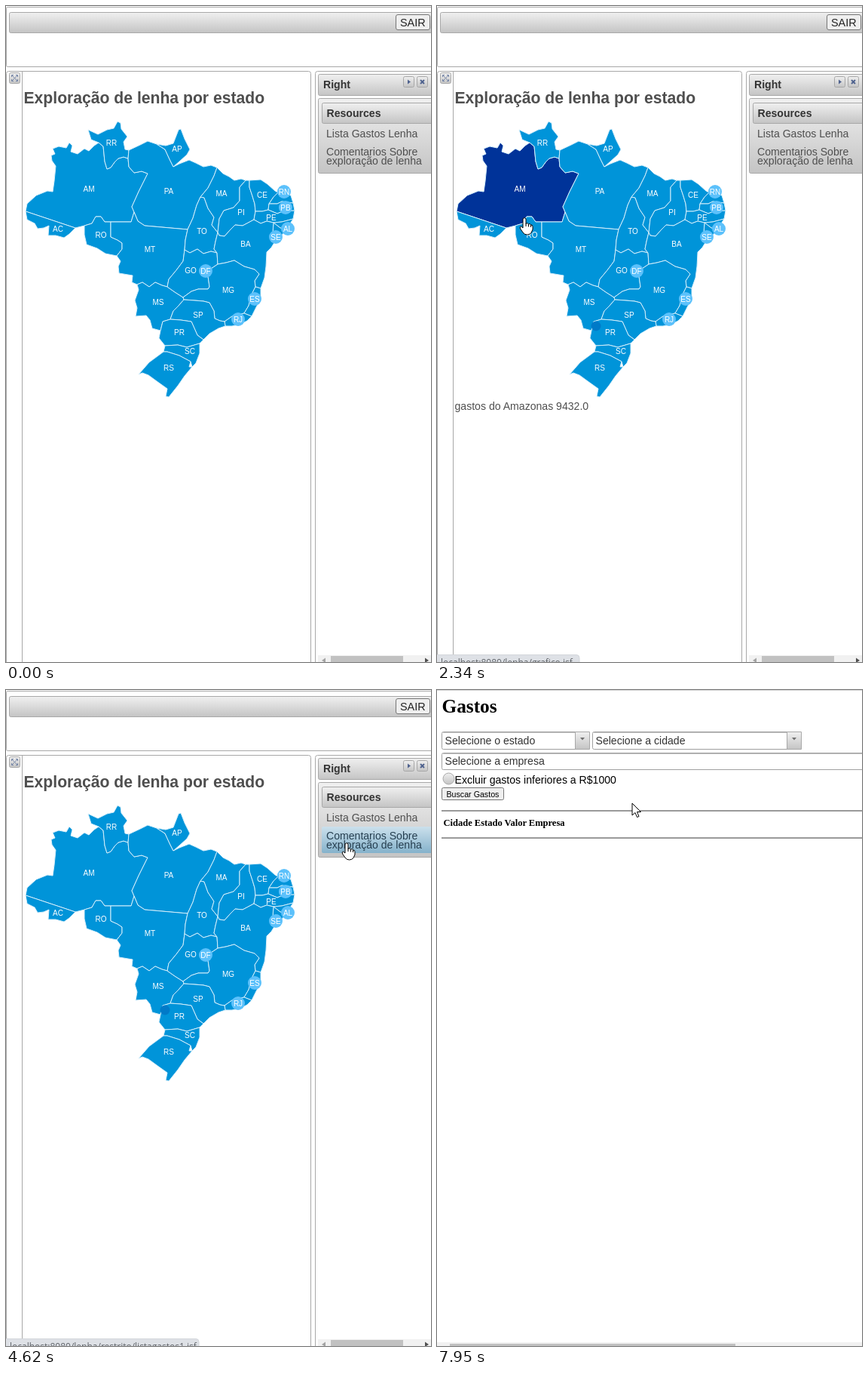
Write an HTML page that moves like this. It is 564 px wide and 869 px high and loops after 8000 ms.

```html
<!DOCTYPE html>
<html lang="pt">
<head>
<meta charset="utf-8">
<title>Gastos por estado</title>
<style>
html, body { margin: 0; width: 100%; height: 100%; overflow: hidden; background: #fff }
svg { display: block; font: 14.08px "Liberation Sans", Arial, sans-serif; fill: #4f4f4f }
.frame { fill: #fff; stroke: #a8a8a8 }
.bar { fill: url(#silver); stroke: #a8a8a8 }
.field { fill: #fff; stroke: #a0a0a0 }
.button { fill: #efefef; stroke: #767676 }
.track { fill: #f1f1f1 }
.thumb { fill: #c1c1c1 }
.icon { fill: #4f628e }
.tick { fill: #707070 }
.bold { font-weight: bold }
.serif { font-family: "Liberation Serif", Times, serif; font-weight: bold; fill: #000 }
#states path { fill: #0094d9; stroke: #d4eefb; stroke-linejoin: round }
#states .on { fill: #039 }
#labels { font-size: 10px; text-anchor: middle; fill: #fff }
#labels circle { fill: #5cc1fb }
#hand, #arrow { fill: #fff; stroke: #000; stroke-linejoin: round }
</style>
</head>
<body>
<svg width="564" height="869" viewBox="0 0 564 869">
<defs>
  <linearGradient id="silver" x2="0" y2="1"><stop stop-color="#f0f0f0"/><stop offset="1" stop-color="#c4c4c4"/></linearGradient>
  <linearGradient id="blue" x2="0" y2="1"><stop stop-color="#cbe0ec"/><stop offset="1" stop-color="#85b2cb"/></linearGradient>
</defs>

<g id="mapPage">
  <rect class="frame" x=".5" y="1.5" width="570" height="79" rx="2"/>
  <rect class="bar" x="4.5" y="8.5" width="566" height="27" rx="2"/>
  <rect class="button" x="517.5" y="11.5" width="45" height="20" rx="2.5"/>
  <text x="523" y="27" font-size="14.4" fill="#222">SAIR</text>
  <rect class="frame" x=".5" y="86.5" width="404" height="800" rx="3"/>
  <path d="M21.5 87V869" stroke="#a8a8a8"/>
  <rect class="bar" x="4.5" y="88.5" width="14" height="14" rx="2"/>
  <path d="M7.5 94V91.500H10M13 91.500h2.500V94M15.500 97v2.500H13M10 99.500H7.500V97M8 92l7 7M15 92l-7 7" fill="none" stroke="#7787a8"/>
  <text class="bold" x="23.500" y="129" font-size="21.15">Exploração de lenha por estado</text>

  <g id="states">
    <path id="AM" d="M26 272L28 262 40 251 55 245 62 246 64 232 66 212 61 205 60 198 65 196 62 189 70 186 80 188 84 181 88 185 86 193 95 196 104 189 110 192 117 185 123 181 129 186 131 206 134 216 139 214 144 207 149 202 156 200 162 202 163 213 170 221 180 219 188 222 176 246 167 266 170 273 166 286 139 286 131 286 126 279 119 279 114 288 104 291 92 294Z"/>
    <path id="AC" d="M26 272L92 294 84 302 77 307 66 304 56 304 57 291 50 294 42 295 38 288 28 283Z"/>
    <path id="RO" d="M104 291L114 288 119 279 126 279 131 286 139 286 139 306 148 310 154 314 154 322 147 331 132 328 121 321 107 316 104 303Z"/>
    <path id="RR" d="M109 164L122 170 134 164 143 162 148 153 152 155 153 163 161 173 156 180 158 190 163 191 162 202 156 200 149 202 144 207 139 214 134 216 131 206 129 186 123 181 113 177Z"/>
    <path id="PA" d="M163 191L178 184 188 179 200 183 211 190 217 203 222 213 230 209 243 204 252 208 262 213 272 211 280 214 276 225 268 241 258 253 253 264 248 281 241 296 184 291 175 285 170 273 167 266 176 246 188 222 180 219 170 221 163 213 162 202Z"/>
    <path id="AP" d="M200 183L212 185 222 182 229 164 232 163 237 176 244 190 240 197 230 206 222 213 217 203 211 190Z"/>
    <path id="MT" d="M139 286H166L170 273 175 285 184 291 241 296 238 310 237 323 235 338 226 350 216 362 214 372 207 370 198 366 190 372 181 366 174 369 167 366 168 357 150 354 149 345 152 338 147 331 154 322 154 314 148 310 139 306Z"/>
    <path id="MS" d="M174 369L181 366 190 372 198 366 207 370 214 372 224 379 235 386 236 389 229 397 222 404 218 415 208 418 205 430 194 427 191 416 186 410 172 411 174 400 171 390 176 376Z"/>
    <path id="TO" d="M258 253L263 254 268 268 276 280 273 290 281 300 278 312 276 322 280 327 272 325 262 328 254 322 244 327 237 323 238 310 241 296 248 281 253 264Z"/>
    <path id="GO" d="M237 323L244 327 254 322 262 328 272 325 280 327 281 342 272 348 268 358 270 372 268 375 255 375 246 378 235 386 224 379 214 372 216 362 226 350 235 338Z"/>
    <path id="MA" d="M280 214L288 222 296 226 303 231 312 229 318 231 310 240 310 258 302 267 289 271 283 282 281 300 273 290 276 280 268 268 263 254 258 253 268 241 276 225Z"/>
    <path id="PI" d="M318 231H323L323 240 327 252 330 262 331 272 329 283 314 291 304 290 298 296 290 305 283 304 281 300 283 282 289 271 302 267 310 258 310 240Z"/>
    <path id="CE" d="M323 231L338 230 347 236 357 245 361 247 355 253 349 262 348 270 340 272 331 272 330 262 327 252 323 240Z"/>
    <path id="RN" d="M361 247L368 248 378 251 381 261 366 259 360 262 349 262 355 253Z"/>
    <path id="PB" d="M349 262H360L366 259 381 261 383 271 367 272 360 275 348 270Z"/>
    <path id="PE" d="M331 272H340L348 270 360 275 367 272 383 271 381 282 366 286 355 287 346 285 338 288 329 283Z"/>
    <path id="AL" d="M355 287L366 286 381 282 372 296 364 294Z"/>
    <path id="SE" d="M355 287L364 294 372 296 364 306 357 312 354 300Z"/>
    <path id="BA" d="M281 300L283 304 290 305 298 296 304 290 314 291 329 283 338 288 346 285 355 287 354 300 357 312 352 320 346 326 345 345 343 360 338 374 331 372 330 364 336 355 330 349 316 345 303 337 292 340 281 342 280 327 276 322 278 312Z"/>
    <path id="MG" d="M281 342L292 340 303 337 316 345 330 349 336 355 330 364 331 372 326 382 322 397 316 407 300 411 290 418 284 417 277 414 276 404 270 393 262 391 250 390 236 389 235 386 246 378 255 375 268 375 270 372 268 358 272 348Z"/>
    <path id="ES" d="M331 372L338 374V388L332 399 326 411 316 407 322 397 326 382Z"/>
    <path id="RJ" d="M316 407L326 411 320 417 312 421 300 424 291 424 290 418 300 411Z"/>
    <path id="SP" d="M236 389L250 390 262 391 270 393 276 404 277 414 284 417 290 418 291 424 282 427 270 434 262 442 254 436 250 427 246 418 232 416 218 415 222 404 229 397Z"/>
    <path id="PR" d="M208 418L218 415 232 416 246 418 250 427 254 436 262 442 257 447 240 452 228 449 211 450 203 440 205 430Z"/>
    <path id="SC" d="M211 450L228 449 240 452 257 447V460L252 473 247 478 245 471 230 463 214 458 209 458Z"/>
    <path id="RS" d="M209 458H214L230 463 245 471 243 478 247 478 237 490 228 503 216 518 212 517 214 507 200 497 189 489 181 486 176 488 190 472Z"/>
  </g>
  <circle id="spot" cx="211" cy="424" r="6.500" fill="#007ac8"/>
  <g id="labels"></g>
  <text id="cost" x="23.500" y="535"></text>

  <rect class="frame" x="410.5" y="86.5" width="170" height="800" rx="3"/>
  <rect class="bar" x="414.5" y="90.5" width="160" height="28" rx="2"/>
  <text class="bold" x="421" y="109" fill="#333">Right</text>
  <rect class="bar" x="527.5" y="93.5" width="14" height="14" rx="2"/>
  <rect class="bar" x="545.5" y="93.5" width="14" height="14" rx="2"/>
  <path class="icon" d="M533 97.500L537 100.500 533 103.500Z"/>
  <path d="M550 98l5 5M555 98l-5 5" stroke="#4f628e" stroke-width="2"/>
  <rect class="bar" x="414.5" y="122.5" width="160" height="99" rx="2"/>
  <rect class="bar" x="419.5" y="128.5" width="160" height="27" rx="2"/>
  <text class="bold" x="425.500" y="147" fill="#333">Resources</text>
  <rect id="hover" x="419" y="181" width="150" height="35" rx="2" fill="url(#blue)"/>
  <text x="425" y="174">Lista Gastos Lenha</text>
  <g id="link"><text x="425" y="198">Comentarios Sobre</text><text x="425" y="210">exploração de lenha</text></g>
  <path class="track" d="M414 860H564V869H414Z"/>
  <path class="thumb" d="M431 861H527V869H431Z"/>
  <path d="M424 863.500V870L419 867Z" fill="#a3a3a3"/>
  <path d="M556 863.500V870L561 867Z" fill="#505050"/>
</g>

<g id="listPage">
  <path d="M0 .5H564" stroke="#d4d4d4"/>
  <text class="serif" x="6.500" y="30" font-size="25.3">Gastos</text>
  <g id="loading">
    <path id="stub" class="field"/>
    <path d="M0 55H15V79H0ZM16 55H33V79H16Z" fill="url(#silver)"/>
    <path d="M7 55.500H18M23 55.500H33M7 78.500H18M23 78.500H33M15.500 56V79" stroke="#a0a0a0"/>
    <path class="tick" d="M6.500 63h6l-3 3.500ZM22 63h6l-3 3.500Z"/>
  </g>
  <g id="form">
    <rect class="field" x="6.5" y="55.500" width="196" height="23" rx="2"/>
    <rect class="field" x="206.5" y="55.500" width="277" height="23" rx="2"/>
    <rect class="field" x="6.5" y="83.500" width="570" height="22" rx="2"/>
    <path d="M8 56.500H183M208 56.500H464M8 84.500H564" stroke="#c0c0c0"/>
    <path class="bar" d="M183.500 55.500h19v23h-19ZM464.500 55.500h19v23h-19Z"/>
    <path class="tick" d="M190 63h6l-3 3.500ZM471 63h6l-3 3.500Z"/>
    <g fill="#333">
      <text x="10.500" y="72">Selecione o estado</text>
      <text x="210.500" y="72">Selecione a cidade</text>
      <text x="10.500" y="99">Selecione a empresa</text>
    </g>
    <circle class="bar" cx="15.500" cy="117.500" r="7.500"/>
    <text x="23.500" y="124" fill="#000">Excluir gastos inferiores a R$1000</text>
    <rect class="button" x="6.5" y="129.500" width="82" height="16" rx="2"/>
    <text x="12.500" y="142" font-size="10.67" fill="#000">Buscar Gastos</text>
    <path d="M6 160H564M6 196H564" stroke="#9a9a9a" stroke-width="2"/>
    <text class="serif" x="8.500" y="180" font-size="12.5">Cidade Estado Valor Empresa</text>
    <path class="track" d="M0 864H564V869H0Z"/>
    <path class="thumb" d="M17 866H396V869H17Z"/>
  </g>
</g>

<g id="status">
  <rect id="bubble" x="-5" y="859.500" height="30" rx="4" fill="#dee1e6" stroke="#d3d6db"/>
  <text id="address" x="5" y="874" font-family="Open Sans, sans-serif" font-size="12" fill="#5f6368"></text>
</g>
<path id="arrow" d="M0 0V16L4 12.500 6.500 18.500 9 17.500 6.500 11.500H11.500Z"/>
<path id="hand" d="M-2 2Q0-1 2 2V8.500Q4 6.500 5.500 9 7.500 7.500 8.500 10 11 9.500 11 12.500V16L9 20.500Q7 23 3.500 23 0 23-2 20L-5.500 15Q-6.500 12-4.500 12L-2 14ZM2 8V12M5.500 9V12.500M8.500 10V13"/>
</svg>
<script>
const $ = id => document.getElementById(id);
const show = (id, on) => $(id).style.display = on ? '' : 'none';
const LOOP = 8000;

// [time, x, y] of the pointer tip
const path = [
  [260, 504, 835], [540, 283, 448], [800, 283, 448], [900, 252, 436], [1100, 211, 424],
  [1250, 203, 398], [1500, 218, 364], [1640, 222, 354], [1910, 222, 354], [2340, 116, 280],
  [2480, 120, 276], [2620, 180, 262], [2850, 235, 270], [2950, 258, 285], [3150, 285, 268],
  [3310, 298, 294], [3510, 298, 294], [4140, 452, 202], [7879, 452, 202], [7880, 330, 175],
  [7949, 330, 175], [7950, 259, 150]
];
// [time, state, caption]
const hovers = [
  [0, '', ''], [900, 'PR', 'gastos do Paraná 28310.0'], [1170, 'MS', 'gastos de Mato Grosso do Sul 6120.0'],
  [1500, 'GO', 'gastos de Goiás 70899.0'], [1990, 'MT', 'gastos de Mato Grosso 15208.0'],
  [2270, 'AM', 'gastos do Amazonas 9432.0'], [2580, 'PA', 'gastos do Pará 41870.0'],
  [2890, 'TO', 'gastos do Tocantins 12045.0'], [3060, 'MA', 'gastos do Maranhão 35160.0'],
  [3310, 'PI', 'gastos do Piaui 39012.0'], [3640, 'CE', 'gastos do Ceará 22740.0'], [3750, '', '']
];
// [time, bubble width, address]
const links = [
  [0, 0, ''], [1640, 189, 'localhost:8080/lenha/grafico.jsf'],
  [2900, 218, 'localhost:8080/lenha/restrito/index.jsf'], [3750, 0, ''],
  [4070, 256, 'localhost:8080/lenha/restrito/listagastos1.jsf']
];
const latest = (list, t) => list.findLast(item => item[0] <= t);

const places = 'RR140,181 AP227,189 AM110,242 PA216,245 MA286,248 CE340,250 PI312,273 PE352,280 TO260,298 ' +
  'BA318,315 AC69,295 RO126,303 MT191,322 GO245,350 MG295,376 MS202,392 SP255,409 PR230,432 SC244,457 ' +
  'RS216,479 RN369,246 PB371,267 AL374,295 SE358,306 DF265,351 ES330,388 RJ308,415';
const dotted = ['RN', 'PB', 'AL', 'SE', 'DF', 'ES', 'RJ'];
$('labels').innerHTML = places.split(' ').map(place => {
  const name = place.slice(0, 2), [x, y] = place.slice(2).split(',').map(Number);
  const dot = dotted.includes(name) ? `<circle cx="${x}" cy="${y}" r="9"/>` : '';
  return `${dot}<text x="${x}" y="${y + 4}">${name}</text>`;
}).join('');

function pointerAt(t) {
  const i = path.findIndex(key => key[0] > t);
  if (i < 0) return path.at(-1).slice(1);
  const [t0, x0, y0] = path[Math.max(i - 1, 0)], [t1, x1, y1] = path[i];
  const k = Math.max(0, (t - t0) / (t1 - t0));
  return [x0 + (x1 - x0) * k, y0 + (y1 - y0) * k];
}

function draw(t) {
  const [, state, caption] = latest(hovers, t);
  for (const shape of $('states').children) shape.classList.toggle('on', shape.id === state);
  $('cost').textContent = caption;
  show('spot', t >= 1170);

  const onLink = t >= 4070;
  show('hover', onLink);
  $('link').style.fill = onLink ? '#263f50' : '';

  show('mapPage', t < 6010);
  show('listPage', t >= 6010);
  show('loading', t < 7090);
  show('form', t >= 7090);
  $('stub').setAttribute('d', `M33 55.500H${t < 6500 ? 37 : 52}q2 0 2 2V78`);

  const [, width, address] = latest(links, t);
  show('status', width && t < 6360);
  $('status').style.opacity = Math.min(1, Math.max(0, (6430 - t) / 210));
  $('bubble').setAttribute('width', width + 5);
  $('address').textContent = address;

  const [x, y] = pointerAt(t);
  const isHand = t < 7880 && (state !== '' || onLink);
  show('hand', isHand);
  show('arrow', t >= 260 && !isHand);
  for (const id of ['hand', 'arrow']) $(id).setAttribute('transform', `translate(${x} ${y})`);
}

const start = performance.now();
function tick() {
  draw((performance.now() - start) % LOOP);
  requestAnimationFrame(tick);
}
tick();
</script>
</body>
</html>
```
